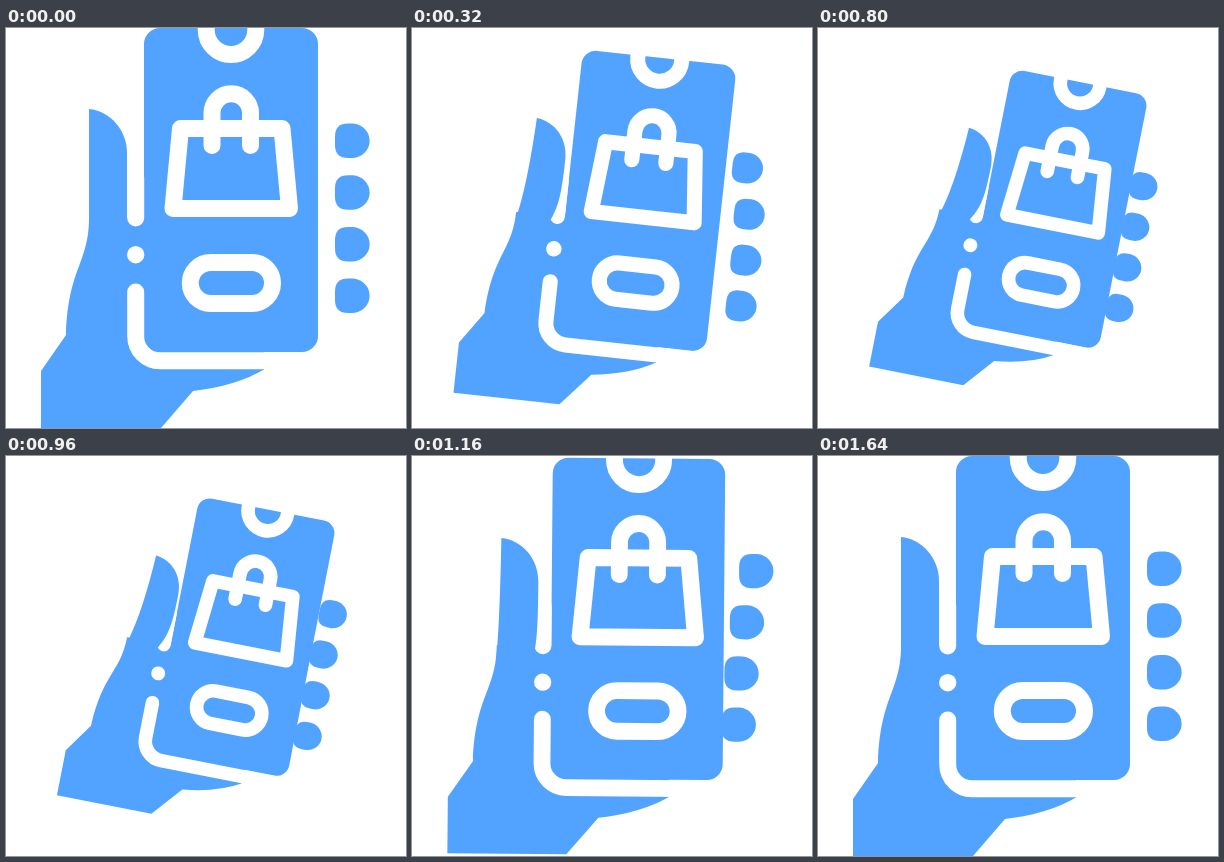
An HTML page for the animation above (2.68 s loop, 400 by 400 pixels).

```html
<!DOCTYPE html>
<html lang="en">
<head>
<meta charset="utf-8">
<title>Shopping by phone</title>
<style>
  html, body { margin: 0; width: 100%; height: 100%; overflow: hidden; background: #fff; }
  svg { display: block; width: 100%; height: 100%; fill: #51a3ff; }
  .line { fill: none; stroke: #fff; stroke-width: 17; stroke-linecap: round; stroke-linejoin: round; }
</style>
</head>
<body>
<svg viewBox="0 0 400 400">
  <defs>
    <path id="finger" d="M347 95.5A18 17.3 0 0 1 347 130H342Q329 130 329 117V108.5Q329 95.5 342 95.5Z"/>
  </defs>
  <g id="scene">
    <path d="M83 190C83 235 62 240 60 307L35 343V400H155L187 363Q230 358 258 341.5V320H145V190Z"/>
    <rect x="138" width="174" height="324" rx="16"/>
    <g class="line">
      <path d="M129.7 150V190M129.7 264V308.5A24.5 24.5 0 0 0 154.2 332.8H300"/>
      <circle cx="225" cy="1.7" r="24.8"/>
      <path d="M174.5 100.5H276L283.5 180.5H167Z"/>
      <path d="M206 117.5V85A19.25 19.25 0 0 1 244.5 85V117.5"/>
      <rect x="184.3" y="234.5" width="82.2" height="41" rx="20.5"/>
    </g>
    <circle cx="129.7" cy="226.7" r="8.7" fill="#fff"/>
    <path id="thumb"/>
    <g id="fingers"></g>
  </g>
</svg>
<script>
const LOOP = 2680, STEP = 40;
const get = id => document.getElementById(id);
const scene = get('scene'), thumb = get('thumb');

// start of closing, start of opening
const fingers = [[92, 818], [178, 925], [266, 994], [403, 1138]].map(([close, open], i) => {
  const el = document.createElementNS('http://www.w3.org/2000/svg', 'use');
  el.setAttribute('href', '#finger');
  get('fingers').append(el);
  return { el, close, open, y: i * 51.7 };
});

// cubic-bezier(.7, 0, .3, 1)
function ease(u) {
  if (u <= 0) return 0;
  if (u >= 1) return 1;
  let lo = 0, hi = 1, s;
  for (let i = 0; i < 24; i++) {
    s = (lo + hi) / 2;
    const r = 1 - s;
    if (2.1 * s * r * r + 0.9 * s * s * r + s * s * s < u) lo = s; else hi = s;
  }
  return s * s * (3 - 2 * s);
}

// rises from 0 to 1, later falls back to 0
const pulse = (t, up, upTime, down, downTime) =>
  ease((t - up) / upTime) - ease((t - down) / downTime);

function bendThumb(d) {
  const tipY = 81 + d / 8, side = 121 + 0.9 * d;
  thumb.setAttribute('d',
    `M83 200C${83 + 0.4 * d} 180 ${83 + 0.8 * d} 150 ${83 + d} ${tipY}` +
    `C${104 + d} ${tipY + 2} ${side} 102 ${side} 125` +
    `C${side} 160 ${121 + 0.85 * d} 178 121 198L121 200Z`);
}

function draw(t) {
  const tilt = pulse(t, 20, 580, 925, 300);
  const move = pulse(t, 20, 580, 945, 280);
  scene.setAttribute('transform',
    `translate(${200 + 11.7 * move} ${200 + 7.2 * move}) ` +
    `rotate(${11.2 * tilt}) scale(${1 - 0.2 * tilt}) translate(-200 -200)`);
  bendThumb(16.5 * pulse(t, 0, 560, 860, 500));
  for (const f of fingers) {
    const shift = -18.5 * pulse(t, f.close, 450, f.open, 500);
    f.el.setAttribute('transform', `translate(${shift} ${f.y})`);
  }
}

let begin;
function tick(now) {
  begin ??= now;
  const t = (now - begin) % LOOP;
  draw(Math.floor(t / STEP) * STEP);
  requestAnimationFrame(tick);
}
draw(0);
requestAnimationFrame(tick);
</script>
</body>
</html>
```
